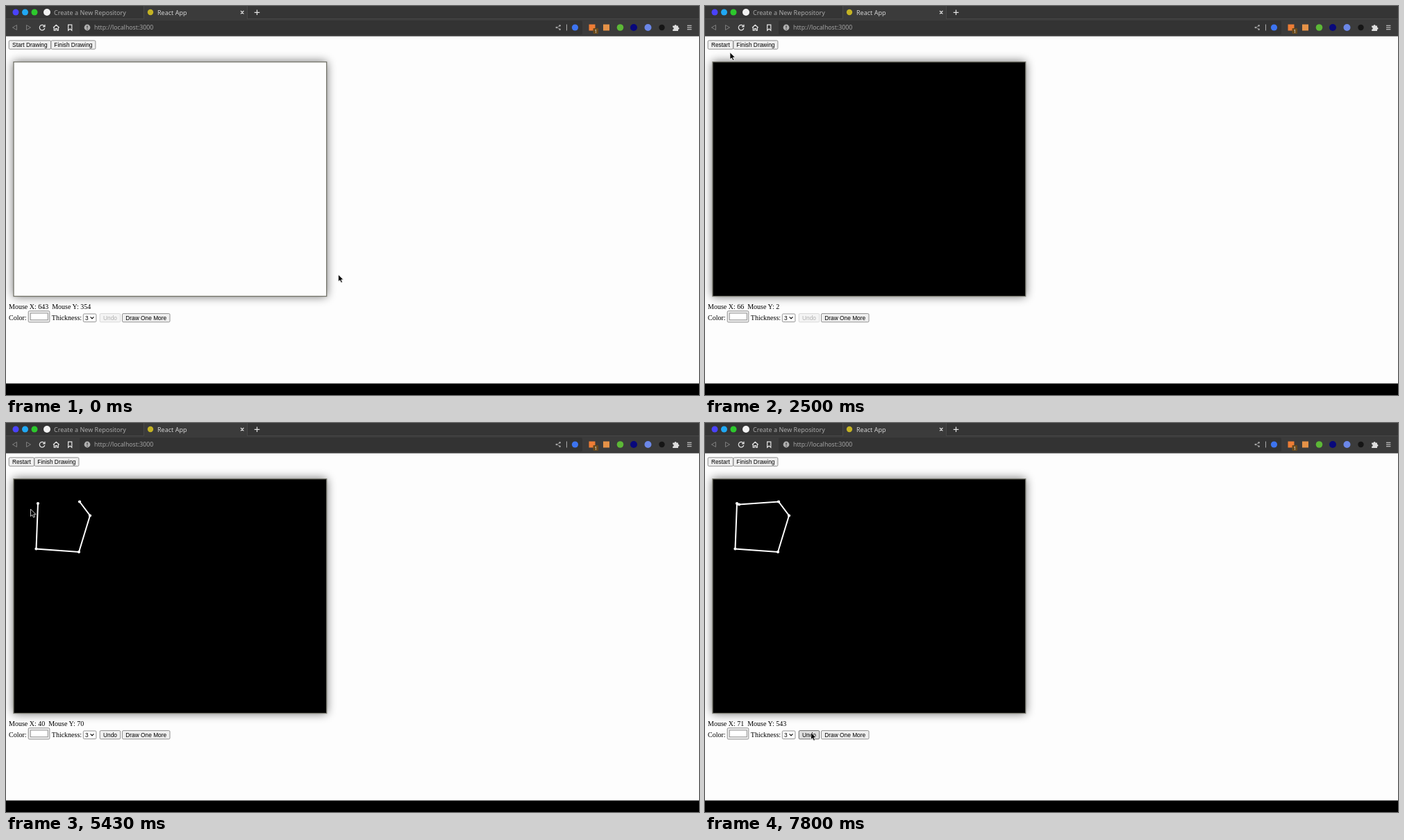
Recreate the animation shown at these times as an HTML page. Size 998 by 561 pixels, loop 8 s.

```html
<!DOCTYPE html>
<html lang="en">
<head>
<meta charset="utf-8">
<title>React App</title>
<style>
  html, body { margin: 0; width: 100%; height: 100%; overflow: hidden; background: #fdfdfd; }
  svg { display: block; width: 998px; height: 561px; }
  .ui { font: 9px "Noto Sans", sans-serif; }
  .page { font: 10px "Liberation Serif", serif; fill: #000; }
  .btn text { font: 8.35px "Liberation Sans", sans-serif; fill: #000; text-anchor: middle; }
  .btn rect { fill: #efefef; stroke: #767676; stroke-width: .8; }
  .btn.hover rect { fill: #dedede; stroke: #4f4f4f; }
  .btn.press rect { fill: #f3f3f3; stroke: #8a8a8a; }
  .btn.off rect { fill: #f4f4f4; stroke: #d0d0d0; }
  .btn.off text { fill: #b0b0b0; }
  .icon { fill: none; stroke: #e4e4e4; stroke-width: 1.2; }
</style>
</head>
<body>
<svg viewBox="0 0 998 561">
  <defs>
    <filter id="blur" x="-10%" y="-10%" width="120%" height="120%"><feGaussianBlur stdDeviation="7"/></filter>
  </defs>

  <!-- browser chrome -->
  <rect width="998" height="44" fill="#3b3b3b"/>
  <rect width="998" height="18.5" fill="#353535"/>
  <rect x="198" width="150" height="19" fill="#3b3b3b"/>
  <path d="M0 18.5H198.5V0M347.5 0V18.5H998" fill="none" stroke="#4c4c4c" stroke-width=".8"/>
  <circle cx="14" cy="9" r="4.5" fill="#4a42fa"/>
  <circle cx="27.5" cy="9" r="4.5" fill="#20a8f4"/>
  <circle cx="41" cy="9" r="4.5" fill="#2dc92d"/>
  <circle cx="59" cy="9" r="5" fill="#f2f2f2"/>
  <circle cx="208" cy="9" r="4.2" fill="#c4b324"/>
  <g class="ui">
    <text x="69" y="12.6" fill="#a9a9a9">Create a New Repository</text>
    <text x="218" y="12.6" fill="#d2d2d2">React App</text>
  </g>
  <g class="icon">
    <path d="M338 7l4.4 4.4M342.4 7L338 11.4M361.5 5.5v7.6M357.7 9.3h7.6"/>
    <path d="M15.5 27.5v7l-6-3.5zM29.5 27.5v7l6-3.5z" stroke="#858585" stroke-width=".9"/>
    <path d="M55.4 29.2a3.8 3.8 0 1 0 .4 2.8M56 26.8v3h-3"/>
    <path d="M68 31.2l4.3-4 4.3 4M69.2 30.5v4.7h2v-2.6h2.2v2.6h2V30.5"/>
    <path d="M89.6 27.2h5.2v8l-2.6-2.2-2.6 2.2z"/>
  </g>
  <rect x="106" y="21" width="724" height="20.5" rx="2" fill="#333"/>
  <circle cx="117" cy="31" r="4.4" fill="#b0b0b0"/>
  <path d="M117 28.4v3.2M117 32.7v1.2" stroke="#333" stroke-width="1.2"/>
  <text class="ui" x="127" y="34.2" fill="#a4a4a4" style="font-size:8.75px">http://localhost:3000</text>
  <path d="M798 28.5l-5 2.5 5 2.5" fill="none" stroke="#9a9a9a" stroke-width=".8"/>
  <g fill="#a8a8a8"><circle cx="797.6" cy="28.3" r="1.3"/><circle cx="792.8" cy="31" r="1.3"/><circle cx="797.6" cy="33.7" r="1.3"/></g>
  <path d="M807.5 26.5v9" stroke="#aaa"/>
  <circle cx="819.5" cy="31" r="4.6" fill="#3d74f0"/>
  <rect x="839.5" y="26.5" width="9" height="9" fill="#ee7d35"/>
  <rect x="845.5" y="32" width="7.5" height="8" rx="1" fill="#6b4b1c"/>
  <text class="ui" x="847.6" y="38.6" fill="#eee" style="font-size:6.5px">1</text>
  <rect x="860" y="26.5" width="9" height="9" fill="#e59247"/>
  <circle cx="884.5" cy="31" r="4.8" fill="#5cb836"/>
  <circle cx="904" cy="31" r="5" fill="#08087c"/>
  <circle cx="924.5" cy="31" r="5" fill="#6b87e8"/>
  <circle cx="944.5" cy="31" r="4.2" fill="#151515"/>
  <path d="M960.2 28.5h2.4a1.5 1.5 0 1 1 3 0h2.4v2.2a1.5 1.5 0 1 1 0 3V36h-7.8v-2.3a1.5 1.5 0 1 0 0-3z" fill="#dedede"/>
  <path d="M981 28.2h6.4M981 31h6.4M981 33.8h6.4" stroke="#dedede" stroke-width="1.1"/>

  <!-- page -->
  <rect y="43.7" width="998" height="501" fill="#fdfdfd"/>
  <rect y="544.4" width="998" height="17"/>
  <rect x="10.5" y="80" width="451.5" height="339" opacity=".55" filter="url(#blur)"/>
  <rect id="board" x="11" y="80.7" width="450.7" height="337.9" stroke="#74746a" stroke-width="1.3"/>
  <polyline id="line" fill="none" stroke="#fff" stroke-width="2"/>
  <g id="dots" fill="#fff"></g>

  <g class="page">
    <text id="mouse" x="4" y="437"></text>
    <text x="4" y="453">Color:</text>
    <text x="65.8" y="453">Thickness:</text>
  </g>
  <rect x="32.2" y="439.8" width="30.6" height="16.2" rx="1.5" fill="#efefef" stroke="#767676" stroke-width=".8"/>
  <rect x="35.2" y="443" width="25" height="9.8" fill="#fff" stroke="#777" stroke-width=".8"/>
  <g class="btn">
    <rect x="111.3" y="444" width="18.6" height="11.6" rx="1.5" style="fill:#fff"/>
    <text x="116.4" y="452.7">3</text>
    <path d="M121.6 448.4l2.4 2.5 2.4-2.5" fill="none" stroke="#111" stroke-width="1.3"/>
  </g>
  <g id="buttons"></g>
  <path id="cursor" d="M0 0V10.4L2.4 8.3L4.1 12L6 11.1L4.3 7.6H7.6Z" fill="#000" stroke="#fff" stroke-width=".8"/>
</svg>

<script>
const NS = 'http://www.w3.org/2000/svg';
const LOOP = 8000, PRESS = 2270, START = 2400;
const LAG = 30, SCALE = 0.626, CLICK_DELAY = 140;
const $ = id => document.getElementById(id);

function add(parent, tag, attrs = {}) {
  const el = document.createElementNS(NS, tag);
  for (const k in attrs) el.setAttribute(k, attrs[k]);
  return parent.appendChild(el);
}

// The pointer glides from stop to stop, optionally curving towards `via`.
const moves = [], clicks = [];
let at = [479, 388], free = 30;

function glide(to, time, via = to.map((v, i) => (v + at[i]) / 2)) {
  moves.push({ from: at, to, via, leave: free, time });
  at = to;
  free += time + 10;
}

function corner(to, time) {
  glide(to, time);
  free += CLICK_DELAY;
  clicks.push({ time: free - 10, to });
}

glide([34, 55], 1170, [147, 240]);
free = START + 50;
corner([46, 116], 470);
corner([43.5, 181.5], 260);
corner([105, 186], 140);
corner([121, 133.5], 260);
corner([106, 113.5], 180);
glide([36, 125], 920, [45, 165]);
corner([49, 117.5], 270);
free = 6370;
glide([41.5, 440], 830, [131, 330]);
glide([153, 447], 490);

function pointer(t) {
  const m = moves.findLast(m => t >= m.leave) || moves[0];
  const left = 1 - Math.min(1, Math.max(0, (t - m.leave) / m.time));
  const v = left * left, u = 1 - v;
  return [0, 1].map(i => v * v * m.from[i] + 2 * u * v * m.via[i] + u * u * m.to[i]);
}

// last position seen by the board
function readout(t) {
  for (let s = t - LAG; s >= 0; s -= 2) {
    const [x, y] = pointer(s);
    if (x >= 11 && x <= 462 && y >= 82 && y <= 421)
      return [x - 11, y - 81].map(d => Math.round(d / SCALE));
  }
  return [643, 354];
}

function button(y, h) {
  const g = add($('buttons'), 'g', { class: 'btn' });
  const box = add(g, 'rect', { y, height: h, rx: 1.5 });
  const label = add(g, 'text', { y: y + 9.2 });
  return (text, x, w, state = '') => {
    box.setAttribute('x', x);
    box.setAttribute('width', w);
    label.setAttribute('x', x + w / 2);
    label.textContent = text;
    g.setAttribute('class', 'btn ' + state);
  };
}

const start = button(49.8, 12.4), finish = button(49.8, 12.4);
const undo = button(443.6, 12.2), more = button(443.6, 12.2);
more('Draw One More', 167.5, 68.5);

const dots = clicks.map(({ to: [cx, cy] }) => add($('dots'), 'circle', { cx, cy, r: 2.1 }));

function draw(t) {
  const [x, y] = pointer(t), [mx, my] = readout(t);
  const on = t >= START, made = clicks.filter(c => t >= c.time);
  const over = (l, r, top, bottom) => x > l && x < r && y > top && y < bottom ? 'hover' : '';

  const pressed = t >= PRESS && !on;
  start(on ? 'Restart' : 'Start Drawing', 4.2, on ? 36.3 : 60.3,
    pressed ? 'press' : over(4, on ? 40 : 64, 49, 63));
  finish('Finish Drawing', on ? 40.9 : 64.9, 64);
  undo('Undo', 135.2, 29.5, made.length ? over(135, 165, 443, 456) : 'off');

  $('board').setAttribute('fill', on ? '#000' : '#fdfdfd');
  $('line').setAttribute('points', made.map(c => c.to.join()).join(' '));
  dots.forEach((d, i) => d.setAttribute('visibility', i < made.length ? 'visible' : 'hidden'));
  $('mouse').textContent = `Mouse X: ${mx}\u00a0 Mouse Y: ${my}`;
  $('cursor').setAttribute('transform', `translate(${x - 0.5} ${y - 0.8})`);
}

const origin = performance.now();
function tick() {
  draw((performance.now() - origin) % LOOP);
  requestAnimationFrame(tick);
}
tick();
</script>
</body>
</html>
```
